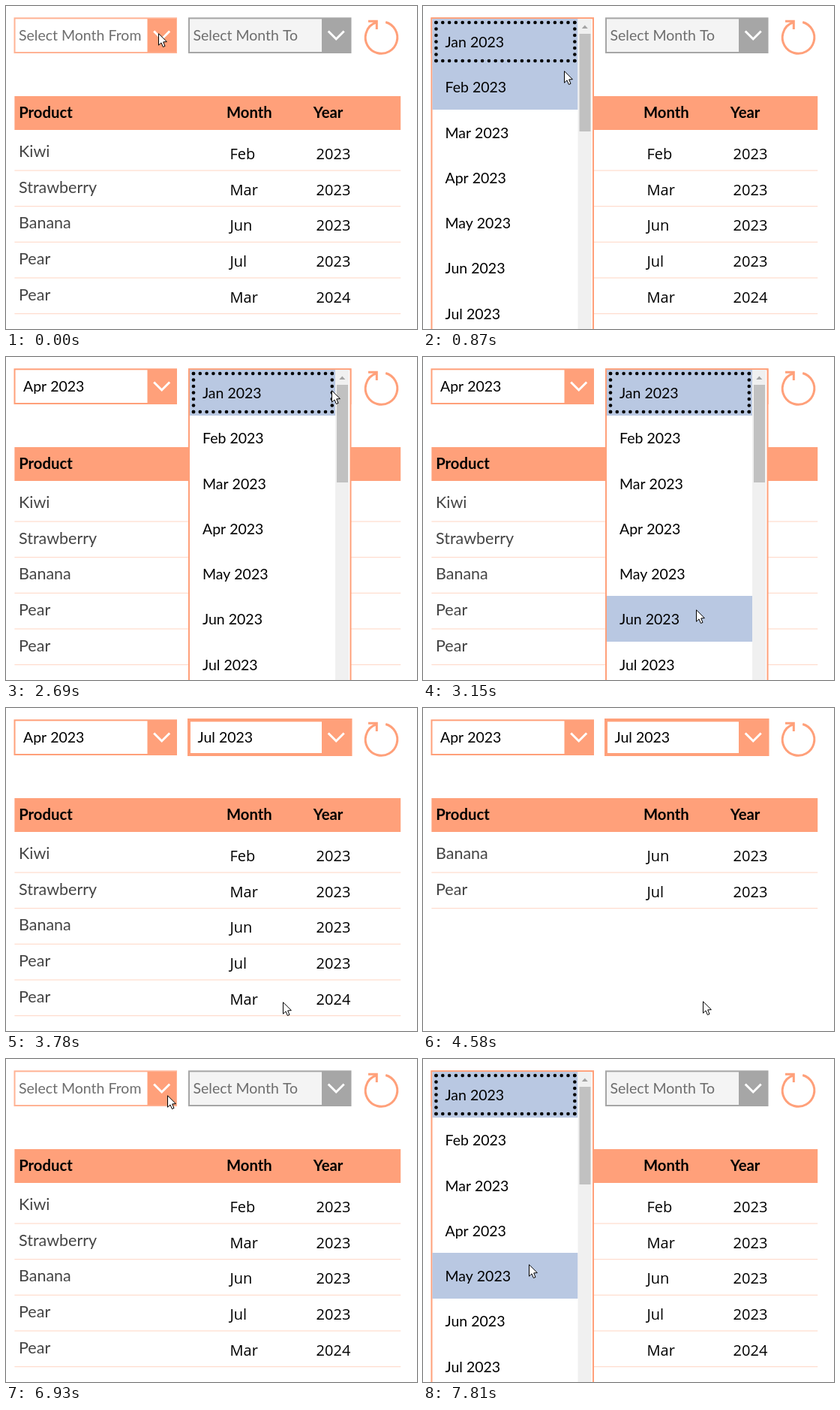
Write an HTML page with a canvas that moves like this. It is 548 px wide and 430 px high and loops after 8 s.

```html
<!DOCTYPE html>
<html lang="en">
<head>
<meta charset="utf-8">
<title>Month range filter</title>
<style>
  html, body { margin: 0; width: 100%; height: 100%; overflow: hidden; background: #fff; }
  canvas { display: block; width: 548px; height: 430px; }
</style>
</head>
<body>
<canvas id="stage"></canvas>
<script>
const W = 548, H = 430, LOOP = 8000;
const ORANGE = '#ffa07a', LIGHT = '#ffb395', GRAY = '#a6a6a6', BLUE = '#b9c8e2';
const LATO = 'Lato, sans-serif', OPEN = '"Open Sans", sans-serif';
const INPUT_FONT = '19.5px ' + LATO;
const MONTHS = ['Jan', 'Feb', 'Mar', 'Apr', 'May', 'Jun', 'Jul'];
const ROWS = [
  ['Kiwi', 'Feb', '2023'], ['Strawberry', 'Mar', '2023'], ['Banana', 'Jun', '2023'],
  ['Pear', 'Jul', '2023'], ['Pear', 'Mar', '2024']
];
const COMBO_X = [10.5, 243];
const COMBO_W = 217.5;
const PITCH = 60.25;
const CLICKS = [200, 1600, 2620, 3430, 6010, 7390];

// Pointer moves: start, end, number of steps, destination
const START = [203, 36];
const MOVES = [
  [800, 1120, 6, 145, 228],
  [1740, 2290, 9, 434, 44],
  [2760, 3150, 7, 364, 336],
  [3220, 3360, 3, 368, 401],
  [3570, 3840, 5, 369, 390],
  [4310, 4310, 1, 370, 390],
  [4580, 4580, 1, 373, 390],
  [4650, 5130, 8, 515, 57],
  [5350, 5350, 1, 510, 52],
  [6150, 6810, 9, 215, 50],
  [6930, 6930, 1, 215, 48],
  [7530, 7810, 5, 141, 273]
];

const canvas = document.getElementById('stage');
const ctx = canvas.getContext('2d');
const dpr = window.devicePixelRatio || 1;
canvas.width = W * dpr;
canvas.height = H * dpr;

const within = (t, a, b) => t >= a && t < b;
const ease = p => p * p * (3 - 2 * p);

function pointerAt(t) {
  let [x, y] = START;
  for (const [a, b, n, tx, ty] of MOVES) {
    if (t < a) break;
    const step = n > 1 ? Math.floor((t - a) / (b - a) * (n - 1) + 0.001) + 1 : 1;
    const p = ease(Math.min(1, step / n));
    x += (tx - x) * p;
    y += (ty - y) * p;
  }
  return [Math.round(x), Math.round(y)];
}

function stateAt(t) {
  const [x, y] = pointerAt(t);
  const s = { x, y, open: -1, focus: -1, picked: 0 };
  if (within(t, 270, 1670) || t >= 7460) s.open = 0;
  if (within(t, 2690, 3500)) s.open = 1;
  if (within(t, 1670, 2690) || within(t, 7390, 7460)) s.focus = 0;
  if (within(t, 3500, 6010)) s.focus = 1;
  if (within(t, 1600, 1670)) s.picked = 3;
  if (within(t, 3430, 3500)) s.picked = 6;
  s.values = [
    within(t, 1670, 6080) ? 'Apr 2023' : '',
    within(t, 3500, 6080) ? 'Jul 2023' : ''
  ];
  s.filtered = within(t, 3980, 6080);
  s.click = CLICKS.some(c => within(t, c, c + 70));
  return s;
}

function box(x, y, w, h, color) {
  ctx.fillStyle = color;
  ctx.fillRect(x, y, w, h);
}

function text(str, x, y, font, color) {
  ctx.font = font;
  ctx.fillStyle = color;
  ctx.fillText(str, x, y);
}

function line(points, color, width) {
  ctx.beginPath();
  points.forEach(([x, y]) => ctx.lineTo(x, y));
  ctx.strokeStyle = color;
  ctx.lineWidth = width;
  ctx.stroke();
}

function drawTable(s) {
  box(11.4, 120, 514.8, 45, ORANGE);
  const head = '700 20.3px ' + LATO;
  text('Product', 17.2, 149, head, '#000');
  text('Month', 294, 149, head, '#000');
  text('Year', 409.8, 149, head, '#000');

  const rows = s.filtered ? ROWS.slice(2, 4) : ROWS;
  rows.forEach(([name, month, year], i) => {
    const dy = Math.round(i * 47.65);
    text(name, 17, 201 + dy, '21.5px ' + LATO, '#444');
    text(month, 298.5, 204 + dy, '20px ' + OPEN, '#000');
    text(year, 413.6, 204 + dy, '20px ' + OPEN, '#000');
    box(11.4, 218.4 + i * 47.65, 514.8, 1.2, '#ffdccd');
  });
}

function drawCombo(i, s) {
  const x = COMBO_X[i];
  const value = s.values[i];
  const disabled = i === 1 && !s.values[0];
  const hover = !disabled && within(s.x, x, x + COMBO_W) && within(s.y, 15, 63);
  const focused = s.focus === i;
  const edge = disabled ? GRAY : hover && !focused ? LIGHT : ORANGE;

  if (focused) box(x - 1, 14, COMBO_W + 2, 50, edge);
  else box(x, 15.3, COMBO_W, 47.7, edge);
  const inset = focused ? 3 : 2;
  box(x + inset, 15.3 + inset, COMBO_W - 2 * inset, 47.7 - 2 * inset, disabled ? '#f4f4f4' : '#fff');
  box(x + 178, 17, 38.5, 44.5, disabled ? GRAY : ORANGE);
  line([[x + 186.7, 33.5], [x + 197.2, 44], [x + 207.7, 33.5]], '#fff', 3);

  if (value) text(value, x + 12.5, 46, INPUT_FONT, '#000');
  else text(i ? 'Select Month To' : 'Select Month From', x + 6.5, 46, INPUT_FONT, '#6e6e6e');
}

function drawReload(s) {
  const color = Math.hypot(s.x - 500.5, s.y - 42) < 24 ? LIGHT : ORANGE;
  ctx.beginPath();
  ctx.arc(500.5, 42, 21.3, -1.3, Math.PI * 1.41);
  ctx.strokeStyle = color;
  ctx.lineWidth = 3;
  ctx.stroke();
  line([[483, 20.3], [494.3, 20.3], [494.3, 31]], color, 3);
}

function dotRow(x1, y1, x2, y2, n) {
  for (let k = 0; k <= n; k++) {
    ctx.beginPath();
    ctx.arc(x1 + (x2 - x1) * k / n, y1 + (y2 - y1) * k / n, 2.3, 0, 7);
    ctx.fill();
  }
}

function dottedFrame(x, y, w, h) {
  ctx.fillStyle = '#000';
  dotRow(x, y, x + w, y, 21);
  dotRow(x, y + h, x + w, y + h, 21);
  dotRow(x, y, x, y + h, 6);
  dotRow(x + w, y, x + w, y + h, 6);
}

function drawList(i, s) {
  const x = COMBO_X[i];
  box(x, 15.3, COMBO_W, 440, ORANGE);
  box(x + 2, 17.3, COMBO_W - 4, 440, '#fff');

  const inside = within(s.x, x + 2, x + 190);
  const hovered = inside ? Math.floor((s.y - 17) / PITCH) : -1;
  MONTHS.forEach((month, k) => {
    const top = Math.round(17 + k * PITCH);
    if (k === s.picked || k === hovered) box(x + 2, top, 194, 61, BLUE);
    if (k === s.picked) dottedFrame(x + 7, top + 5, 184.8, 51);
    text(month + ' 2023', x + 19, top + 38, INPUT_FONT, '#000');
  });

  box(x + 196, 17, 18, 440, '#f0f0f0');
  box(x + 198, 37, 15, 130, '#c1c1c1');
  ctx.beginPath();
  ctx.moveTo(x + 201.3, 30);
  ctx.lineTo(x + 205.3, 25.5);
  ctx.lineTo(x + 209.3, 30);
  ctx.fillStyle = '#a3a3a3';
  ctx.fill();
}

function drawPointer(s) {
  if (s.click) {
    ctx.beginPath();
    ctx.arc(s.x, s.y, 12, 0, 7);
    ctx.fillStyle = 'rgba(226, 228, 92, 0.87)';
    ctx.fill();
  }
  ctx.beginPath();
  [[0.5, 0.8], [0.5, 16.2], [4, 12.9], [6.4, 18.5], [9, 17.4], [6.7, 11.9], [11.4, 11.6]]
    .forEach(([dx, dy]) => ctx.lineTo(s.x + dx, s.y + dy));
  ctx.closePath();
  ctx.fillStyle = '#fff';
  ctx.fill();
  ctx.strokeStyle = '#000';
  ctx.lineWidth = 1;
  ctx.stroke();
}

function draw(t) {
  const s = stateAt(t);
  ctx.setTransform(dpr, 0, 0, dpr, 0, 0);
  box(0, 0, W, H, '#fff');
  drawTable(s);
  drawCombo(0, s);
  drawCombo(1, s);
  drawReload(s);
  if (s.open >= 0) drawList(s.open, s);
  drawPointer(s);
}

const begin = performance.now();
function tick() {
  draw((performance.now() - begin) % LOOP);
  requestAnimationFrame(tick);
}
tick();
</script>
</body>
</html>
```
